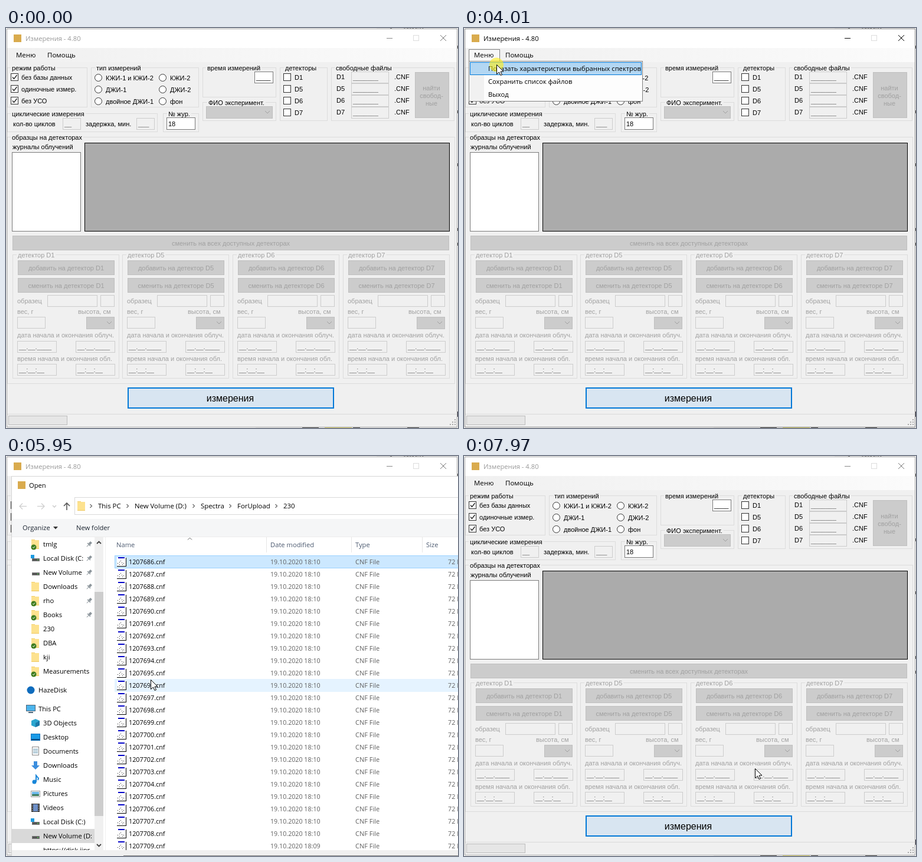
An HTML page with a canvas for the animation above (8000 ms loop, 766 px wide and 680 px high).

```html
<!DOCTYPE html>
<html lang="ru">
<head>
<meta charset="utf-8">
<title>Измерения</title>
<style>
html, body { margin: 0; width: 766px; height: 680px; overflow: hidden; background: #fff; }
canvas { display: block; }
</style>
</head>
<body>
<canvas id="stage" width="766" height="680"></canvas>
<script>
const ctx = document.getElementById('stage').getContext('2d');
const LOOP = 8000;
const UI = '"Open Sans", "Noto Sans", sans-serif';
const FORM = '"Liberation Sans", Arial, sans-serif';
const FACE = '#f0f0f0', OFF = '#a0a0a0', BLUE = '#0078d7', HOVER = '#b3d7f3';

function rect(x, y, w, h, fill, stroke) {
  if (fill) { ctx.fillStyle = fill; ctx.fillRect(x, y, w, h); }
  if (stroke) {
    ctx.strokeStyle = stroke; ctx.lineWidth = 1;
    ctx.strokeRect(x + .5, y + .5, w - 1, h - 1);
  }
}
function line(points, color, width = 1) {
  ctx.beginPath();
  for (let i = 0; i < points.length; i += 2) ctx.lineTo(points[i], points[i + 1]);
  ctx.strokeStyle = color; ctx.lineWidth = width; ctx.stroke();
}
function poly(points, fill) {
  ctx.beginPath();
  for (let i = 0; i < points.length; i += 2) ctx.lineTo(points[i], points[i + 1]);
  ctx.fillStyle = fill; ctx.fill();
}
function disc(x, y, r, fill, stroke) {
  ctx.beginPath(); ctx.arc(x, y, r, 0, 7);
  if (fill) { ctx.fillStyle = fill; ctx.fill(); }
  if (stroke) { ctx.strokeStyle = stroke; ctx.lineWidth = 1; ctx.stroke(); }
}
// y is the vertical middle of the letters
function text(s, x, y, color = '#000', size = 11, family = FORM, align = 'left') {
  ctx.font = size + 'px ' + family;
  ctx.textAlign = align; ctx.fillStyle = color;
  ctx.fillText(s, x, y + Math.round(size * .34));
}
const ui = (s, x, y, color = '#000', size = 11.2) => text(s, x, y, color, size, UI);
function clipped(x, y, w, h, draw) {
  ctx.save(); ctx.beginPath(); ctx.rect(x, y, w, h); ctx.clip();
  draw(); ctx.restore();
}

// ---------- main form ----------
function group(x, y, right, bottom, label, tx, color = '#000') {
  rect(x, y, right - x, bottom - y, null, '#dcdcdc');
  ctx.font = '11px ' + FORM;
  rect(tx - 2, y - 3, ctx.measureText(label).width + 4, 8, FACE);
  text(label, tx, y + 1, color);
}
function field(x, y, w, h, value = '', on = false) {
  rect(x, y, w, h, on ? '#fff' : FACE, on ? '#7a7a7a' : '#cccccc');
  text(value, x + 3, y + h / 2, on ? '#000' : '#6d6d6d');
}
function button(x, y, w, h, label) {
  rect(x, y, w, h, '#cccccc', '#bfbfbf');
  text(label, x + w / 2, y + h / 2 + .5, OFF, 11, FORM, 'center');
}
function combo(x, y, w) {
  rect(x, y, w, 21, '#cccccc', '#bfbfbf');
  const cx = x + w - 9;
  line([cx - 4, y + 8, cx, y + 12, cx + 4, y + 8], '#a0a0a0');
}
function check(x, cy, label, on) {
  rect(x, cy - 7, 13, 13, '#fff', '#333');
  if (on) line([x + 3, cy - .5, x + 5.5, cy + 2.5, x + 10.5, cy - 4], '#222', 1.4);
  text(label, x + 19 - (on ? 1 : 0), cy);
}
function radio(cx, cy, label) {
  disc(cx + .5, cy + .5, 6, '#fff', '#333');
  text(label, cx + 13, cy + 1);
}
function detector(x, name) {
  group(x, 385, x + 181, 596, 'детектор ' + name, x + 9, OFF);
  button(x + 9, 395, 164, 25, 'добавить на детектор ' + name);
  button(x + 9, 425, 164, 25, 'сменить на детекторе ' + name);
  text('образец', x + 8, 464, OFF);
  field(x + 59, 454, 85, 20);
  field(x + 149, 454, 24, 20);
  text('вес, г', x + 8, 482, OFF);
  text('высота, см', x + 111, 482, OFF);
  field(x + 8, 491, 48, 20);
  combo(x + 125, 491, 48);
  text('дата начала и окончания облуч.', x + 8, 522, OFF);
  text('время начала и окончания обл.', x + 8, 562, OFF);
  for (const dx of [8, 107]) {
    field(x + dx, 532, 67, 20, '__.__.____');
    field(x + dx, 571, 67, 20, '__:__:__');
  }
}
function backdrop() {
  rect(0, 0, 766, 680, '#fff');
  rect(628, 0, 138, 1, FACE);
  text('Back', 673, -3, '#777', 16, UI);
  rect(651, 0, 3, 1, '#888');
  for (const y of [30, 140, 230, 340, 365]) rect(765, y, 1, 5, '#555');
  rect(765, 652, 1, 9, '#334');
  rect(423, 679, 343, 1, FACE);
  rect(502, 679, 28, 1, '#555');
  rect(540, 679, 46, 1, '#d8d070');
  rect(588, 679, 12, 1, '#555');
  rect(680, 679, 20, 1, '#555');
}
function appIcon(x, y) { rect(x, y, 13, 13, '#d9ab4e'); }

function mainForm(active, menuState) {
  rect(1, 1, 764, 678, FACE, active ? '#8a8a8a' : '#a6a6a6');
  rect(2, 2, 762, 32, '#fff');
  appIcon(13, 11);
  ui('Измерения - 4.80', 33, 18, active ? '#000' : '#999');
  rect(645, 17, 10, 1, active ? '#000' : '#888');
  rect(690, 12, 10, 10, null, '#dddddd');
  line([736, 12, 746, 22], active ? '#000' : '#777');
  line([746, 12, 736, 22], active ? '#000' : '#777');

  const strip = ctx.createLinearGradient(2, 0, 764, 0);
  strip.addColorStop(0, FACE); strip.addColorStop(1, '#fbfbfb');
  rect(2, 34, 762, 24, strip);
  if (menuState === 'hover') rect(8, 36, 53, 20, HOVER, BLUE);
  if (menuState === 'open') rect(8, 36, 53, 21, '#f7f7f7', '#808080');
  ui('Меню', 17, 46, '#000', 11.4);
  ui('Помощь', 70, 46, '#000', 11.5);

  group(2, 67, 138, 135, 'режим работы', 10);
  ['без базы данных', 'одиночные измер.', 'без УСО'].forEach((s, i) => check(8, 84 + 20 * i, s, true));

  group(144, 67, 327, 135, 'тип измерений', 153);
  ['КЖИ-1 и КЖИ-2', 'ДЖИ-1', 'двойное ДЖИ-1'].forEach((s, i) => radio(156, 84 + 20 * i, s));
  ['КЖИ-2', 'ДЖИ-2', 'фон'].forEach((s, i) => radio(265, 84 + 20 * i, s));

  group(333, 67, 458, 118, 'время измерений', 341);
  field(421, 74, 32, 20, '____', true);
  group(333, 126, 458, 158, 'ФИО эксперимент.', 343);
  combo(339, 133, 113);

  group(464, 67, 545, 158, 'детекторы', 473);
  group(551, 67, 760, 158, 'свободные файлы', 559);
  ['D1', 'D5', 'D6', 'D7'].forEach((name, i) => {
    const y = 84 + 20 * i;
    check(470, y, name, false);
    text(name, 560, y - 1);
    field(585, y - 10, 64, 20, '_______');
    text('.CNF', 658, y - 1);
    detector([11, 197, 384, 571][i], name);
  });
  button(693, 75, 58, 78, '');
  ['найти', 'свобод-', 'ные'].forEach((s, i) => text(s, 721, 102 + 13 * i, OFF, 11, FORM, 'center'));

  group(2, 145, 257, 177, 'циклические измерения', 10);
  text('кол-во циклов', 12, 163);
  field(96, 153, 31, 20, '__');
  text('задержка, мин.', 135, 163);
  field(221, 153, 31, 20, '___');
  group(266, 145, 327, 177, '№ жур.', 275);
  field(272, 152, 49, 21, '18', true);

  group(2, 185, 761, 605, 'образцы на детекторах', 10);
  text('журналы облучений', 11, 202);
  rect(10, 211, 117, 135, '#fff', '#7a7a7a');
  rect(133, 195, 619, 151, '#ababab', '#000');
  button(11, 353, 740, 25, 'сменить на всех доступных детекторах');

  rect(206, 611, 350, 36, BLUE);
  rect(208, 613, 346, 32, '#d8e5f1');
  text('измерения', 380, 630, '#000', 16, FORM, 'center');

  rect(2, 656, 762, 1, '#dadada');
  rect(4, 659, 100, 16, '#e6e6e6', '#bcbcbc');
  for (let i = 0; i < 3; i++)
    for (let j = 0; j <= i; j++) rect(760 - 4 * j, 665 + 4 * i, 2, 2, '#a8a8a8');
}
function dropDown(selected) {
  rect(8, 56, 295, 69, '#fdfdfd', '#808080');
  rect(10, 58, 24, 65, '#f1f1f1');
  if (selected) rect(10, 58, 291, 22, HOVER, BLUE);
  ['Показать характеристики выбранных спектров', 'Сохранить список файлов', 'Выход']
    .forEach((s, i) => ui(s, 41, 69 + 22 * i));
}

// ---------- file dialog ----------
function chevron(x, y, color = '#666') { line([x - 1.5, y - 3, x + 1.5, y, x - 1.5, y + 3], color, 1.2); }
function folder(x, y, synced) {
  rect(x, y - 8, 6, 2, '#f3cf6b');
  rect(x, y - 7, 13, 15, '#fde28f');
  rect(x, y + 7, 13, 1, '#efc860');
  if (synced) {
    disc(x + 4, y + 5, 4.5, '#3f7d20');
    line([x + 2, y + 5, x + 3.5, y + 6.5, x + 6, y + 3.5], '#fff');
  }
}
function drive(y, system) {
  rect(44, y, 13, 5, '#555', '#777');
  rect(53, y + 2, 2, 1, '#5f5');
  if (system) rect(42, y - 6, 6, 6, '#1e9be0');
}
const placeIcons = [
  y => { poly([43, y - 4, 50, y - 7, 57, y - 4, 57, y + 4, 50, y + 7, 43, y + 4], '#2aa5cf'); poly([50, y, 57, y - 4, 57, y + 4, 50, y + 7], '#1c78a8'); },
  y => { rect(42, y - 6, 16, 12, '#1a9be8', '#0d6fb8'); rect(43, y + 3, 14, 2, '#0b4f86'); },
  y => { rect(44, y - 8, 12, 15, '#fff', '#888'); for (let i = -4; i < 5; i += 3) rect(46, y + i, 8, 1, '#4b86a5'); },
  y => poly([47, y - 7, 53, y - 7, 53, y, 57, y, 50, y + 7, 43, y, 47, y], '#3b8ede'),
  y => { disc(48, y + 4, 3.5, '#1886d9'); line([51, y + 4, 51, y - 7, 55, y - 2, 54, y + 1], '#1886d9', 2); },
  y => { rect(42, y - 5, 16, 11, '#fff', '#999'); rect(44, y - 3, 12, 7, '#6bb6e8'); rect(44, y + 1, 12, 3, '#3d7a5a'); },
  y => { rect(43, y - 7, 14, 14, '#333'); rect(46, y - 6, 8, 12, '#6d8fc7'); for (let i = -5; i < 6; i += 3) { rect(44, y + i, 1, 1, '#fff'); rect(55, y + i, 1, 1, '#fff'); } },
  y => drive(y, true),
  y => drive(y, false),
  y => drive(y, false)
];
const quick = ['tmlg', 'Local Disk (C:', 'New Volume', 'Downloads', 'rho', 'Books', '230', 'DBA', 'kji', 'Measurements'];
const synced = ['tmlg', 'rho', 'Books', 'DBA', 'Measurements'];
const places = ['3D Objects', 'Desktop', 'Documents', 'Downloads', 'Music', 'Pictures', 'Videos',
  'Local Disk (C:)', 'New Volume (D:', 'https://disk.jinr.'];

function pin(x, y) {
  ctx.save(); ctx.translate(x, y); ctx.rotate(.78);
  rect(-2, -5, 4, 5, '#8d969c'); rect(-3.5, 0, 7, 1.5, '#8d969c'); rect(-.5, 1, 1, 5, '#8d969c');
  ctx.restore();
}
function sidebar() {
  rect(10, 634, 140, 24, '#d9d9d9');
  clipped(10, 138, 139, 532, () => {
    quick.forEach((s, i) => {
      const y = 150 + 24 * i;
      if (i === 1 || i === 2) drive(y, i === 1); else folder(43, y, synced.includes(s));
      ui(s, 63, y);
      if (i < 6) pin(141, y);
    });
    disc(42, 398, 6.5, '#0f6cbd');
    ui('HazeDisk', 55, 398);
    rect(34, 423, 16, 11, '#4cb4ec', '#4b6478');
    rect(38, 435, 8, 2, '#4b6478');
    ui('This PC', 55, 430);
    places.forEach((s, i) => {
      const y = 454 + 24 * i;
      placeIcons[i](y);
      ui(s, 63, y);
    });
  });
  rect(150, 138, 15, 532, FACE);
  rect(150, 231, 15, 381, '#cdcdcd');
  line([154, 149, 157.5, 145.5, 161, 149], '#404040', 1.8);
  line([154, 660, 157.5, 663.5, 161, 660], '#404040', 1.8);
  rect(168, 138, 1, 532, '#f0f0f0');
}
function fileIcon(y) {
  rect(188, y - 8, 15, 15, '#fff');
  rect(190, y - 8, 11, 2, '#0000c8');
  rect(203, y - 7, 1, 15, '#000');
  rect(188, y + 7, 16, 1, '#000');
  for (const [dx, dy] of [[1, 2], [4, 0], [6, -2], [8, 1], [11, 2], [4, 4], [9, 4]])
    rect(188 + dx, y + dy, 1, 1, '#222');
}
function rowBack(i, top, selected, focused, hovered) {
  if (i < selected && focused) rect(184, top, 590, 22, '#cce8ff', '#99d1ff');
  else if (i < selected) {
    rect(184, top, 590, 21, '#d9d9d9');
    if (i > 0) rect(184, top, 590, 1, '#adadad');
  } else if (i === hovered) rect(184, top, 590, 22, '#e5f3ff');
}
function fileList(selected, focused, hovered) {
  const head = '#4c5a70', gray = '#606060';
  ui('Name', 187, 151, head);
  ui('Date modified', 448, 151, head);
  ui('Type', 592, 151, head);
  ui('Size', 712, 151, head);
  for (const x of [441, 585, 705]) rect(x, 138, 1, 26, '#e5e5e5');
  line([308, 142.5, 311.5, 139, 315, 142.5], '#666');
  clipped(169, 164, 597, 506, () => {
    for (let i = 0; i < 24; i++) {
      const y = 180 + 21 * i;
      rowBack(i, y - 11, selected, focused, hovered);
      fileIcon(y);
      ui(1207686 + i + '.cnf', 208, y, '#000', 10.8);
      ui('19.10.2020 18:' + (i < 23 ? '10' : '09'), 448, y, gray, 10.7);
      ui('CNF File', 592, y, gray, 11);
      ui('72 KB', 749, y, gray, 10.8);
    }
  });
}
function navigation() {
  for (const [x, d] of [[29, -1], [59, 1]]) {
    line([x - 6, 85.5, x + 6, 85.5], '#cfcfcf', 1.3);
    line([x + d, 80.5, x + 6 * d, 85.5, x + d, 90.5], '#cfcfcf', 1.3);
  }
  line([79, 84, 82, 87, 85, 84], '#c8c8c8', 1.3);
  line([103, 92, 103, 80], '#555', 1.6);
  line([98, 85, 103, 80, 108, 85], '#555', 1.6);
  rect(116, 70, 660, 30, '#fff', '#d9d9d9');
  folder(121, 85, false);
  [[144, 'This PC', 156], [206, 'New Volume (D:)', 218], [318, 'Spectra', 330],
   [380, 'ForUpload', 392], [458, '230', 470]].forEach(([cx, s, x]) => {
    chevron(cx, 85);
    ui(s, x, 85, '#000', 11.4);
  });
  rect(10, 107, 756, 30, '#f5f6f7');
  rect(10, 137, 756, 1, '#ececec');
  ui('Organize', 28, 122, '#1b2430');
  poly([80, 120, 88, 120, 84, 124.5], '#333');
  ui('New folder', 119, 122, '#1b2430');
}
function dialog(t, cursor) {
  rect(9, 34, 757, 646, '#d5d5d5');
  rect(10, 35, 756, 635, '#fff');
  rect(10, 670, 756, 10, FACE);
  // top edge of the file name box, blue while it has the focus
  rect(199, 679, 567, 1, t < 4710 ? '#fff' : t < 5570 ? BLUE : '#7a7a7a');
  appIcon(20, 43);
  ui('Open', 39, 50);
  if (t >= 4630) navigation();
  if (t >= 4780) sidebar();
  if (t >= 4860) {
    const selected = t < 5490 ? 0 : t < 6100 ? 1 : 11;
    const hovered = cursor && cursor.x >= 184 ? Math.floor((cursor.y - 169) / 21) : -1;
    fileList(selected, t < 7120, hovered);
  }
}

// ---------- pointer ----------
// start, end, positions, from x, y, to x, y
const moves = [
  [1370, 1990, 9, 276, 575, 20, 34],
  [2300, 2530, 4, 28, 41, 58, 63],
  [2760, 2830, 2, 38, 52, 24, 43],
  [3060, 3060, 1, 22, 41, 22, 41],
  [3310, 3310, 1, 22, 44, 22, 44],
  [3460, 3610, 3, 30, 50, 55, 62],
  [4930, 5320, 6, 62, 66, 229, 176],
  [5570, 5950, 6, 230, 190, 245, 380],
  [6180, 6340, 3, 246, 386, 262, 430],
  [7580, 7810, 4, 714, 622, 435, 565],
  [7890, 7970, 2, 455, 544, 493, 531]
];
const clicks = [[2070, 2300], [3160, 3310], [4010, 4250], [5490, 5640], [6100, 6260]];
const ease = u => u * u * (3 - 2 * u);

function pointerAt(t) {
  if (t < 1370 || (t >= 6420 && t < 7580)) return null;
  const [t0, t1, n, x0, y0, x1, y1] = moves.filter(m => t >= m[0]).pop();
  const step = n > 1 ? Math.min(n - 1, Math.floor((t - t0) / (t1 - t0) * (n - 1) + 1e-6)) : 0;
  const u = n > 1 ? ease(step / (n - 1)) : 0;
  return { x: Math.round(x0 + (x1 - x0) * u), y: Math.round(y0 + (y1 - y0) * u) };
}
function drawPointer({ x, y }, t) {
  if (clicks.some(([a, b]) => t >= a && t < b)) disc(x, y + .5, 12, 'rgba(255,240,20,.6)');
  ctx.save();
  ctx.translate(x + .5, y + .5);
  const arrow = [0, 0, 0, 16, 4, 12.5, 6.5, 18, 9, 17, 6.6, 11.5, 11.5, 11.5, 0, 0];
  poly(arrow, '#fff');
  line(arrow, '#000');
  ctx.restore();
}

function draw(t) {
  const cursor = pointerAt(t);
  const open = t >= 3240 && t < 4180;
  const menu = open ? 'open' : t >= 2760 && t < 3240 ? 'hover' : '';
  backdrop();
  mainForm(t >= 2220 && t < 4180, menu);
  if (open) dropDown(t >= 3535);
  if (t >= 4550 && t < 7200) dialog(t, cursor);
  if (cursor) drawPointer(cursor, t);
}
const start = performance.now();
function frame() {
  draw((performance.now() - start) % LOOP);
  requestAnimationFrame(frame);
}
frame();
</script>
</body>
</html>
```
